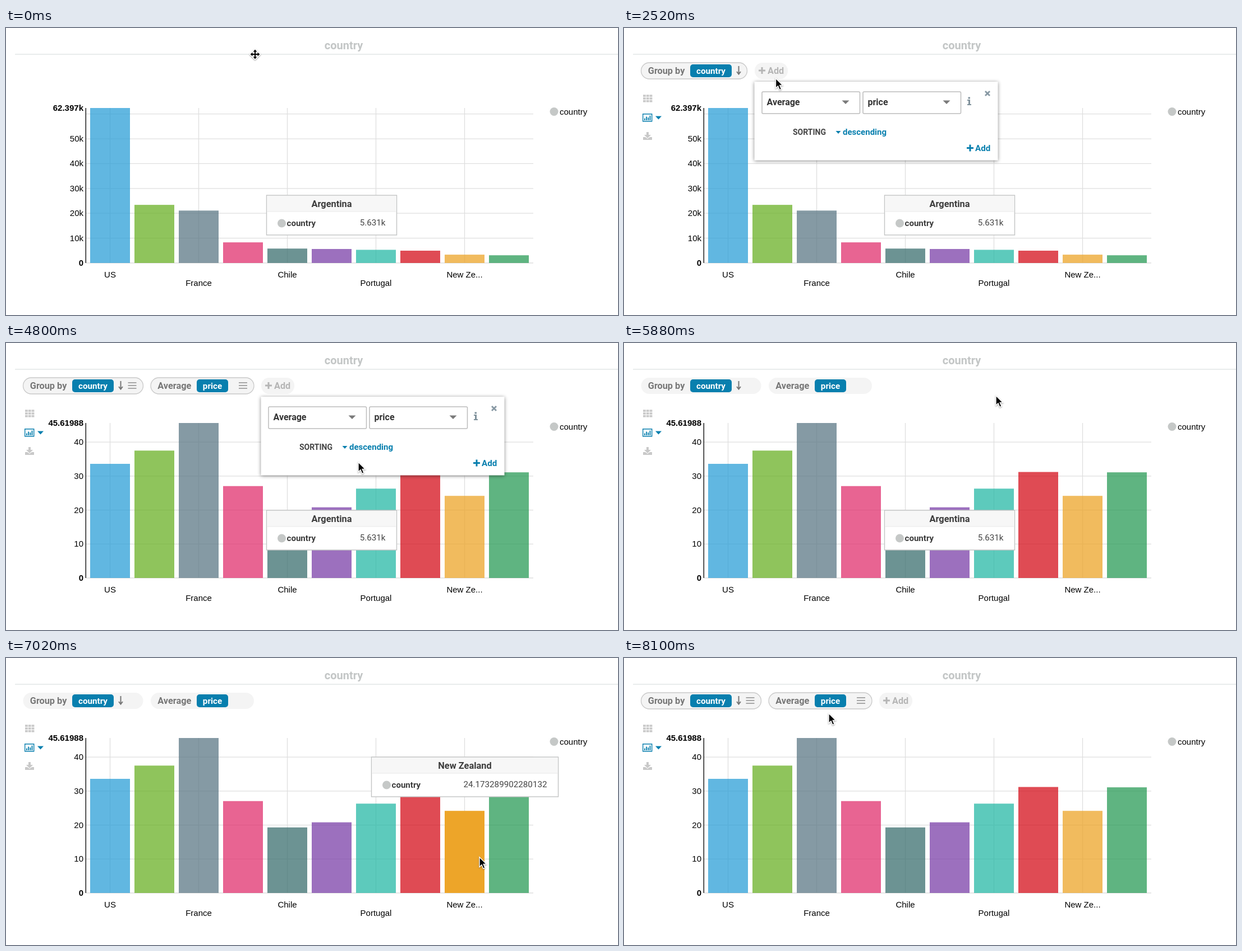
Write an HTML page that moves like this. It is 1091 px wide and 513 px high and loops after 8160 ms.

```html
<!DOCTYPE html>
<html lang="en">
<head>
<meta charset="utf-8">
<title>Chart demo</title>
<style>
html, body { margin: 0; width: 100%; height: 100%; overflow: hidden; background: #fff; }
svg { display: block; }
text { font: 700 16px Roboto, sans-serif; }
#chart text { font: 15px "Liberation Sans", Arial, sans-serif; }
#chart .b { font-weight: 700; }
</style>
</head>
<body>
<svg id="stage" width="1091" height="513" viewBox="0 0 1091 513"></svg>
<script>
const LOOP = 8160, BASE = 420, HIGH = 277, STEP = 79;
const ADDED = 4130; // the price average joins the chart
const BLUE = '#087fae', PALE = '#c9c9c9';

// Country, colour, count in thousands, average price
const data = [
  ['US', '#2d9fd7', 62.397, 33.6],
  ['Italy', '#6ab026', 23.4, 37.5],
  ['France', '#5d7886', 21.1, 45.61988],
  ['Spain', '#e0306e', 8.3, 27.048529411764704],
  ['Chile', '#3b6f6f', 5.8, 19.3],
  ['Argentina', '#7b40a9', 5.631, 20.8],
  ['Portugal', '#27b9a6', 5.3, 26.3],
  ['Australia', '#d50f1b', 4.95, 31.2],
  ['New Zealand', '#eda529', 3.35, 24.173289902280132],
  ['Austria', '#2a9b57', 3.1, 31.1]
];
const peaks = [data[0][2], data[2][3]];
const barX = i => 150 + STEP * i;
const topOf = (i, n) => BASE - data[i][2 + n] / peaks[n] * HIGH;

// Markup helpers
const text = (x, y, s, size, fill, more = '') =>
  `<text x="${x}" y="${y}" style="font-size:${size}px" fill="${fill}" ${more}>${s}</text>`;
const label = (x, y, s, anchor = 'start', cls = '') =>
  `<text x="${x}" y="${y}" text-anchor="${anchor}" class="${cls}">${s}</text>`;
const rect = (x, y, w, h, fill, more = '') =>
  `<rect x="${x}" y="${y}" width="${w}" height="${h}" fill="${fill}" ${more}/>`;
const line = (d, stroke, w = 1.3) => `<path d="${d}" fill="none" stroke="${stroke}" stroke-width="${w}"/>`;
const shape = (d, fill, more = '') => `<path d="${d}" fill="${fill}" ${more}/>`;
const dot = (x, y) => `<circle cx="${x}" cy="${y}" r="7.5" fill="#c5c8c7"/>`;
const plus = (x, y, c) => line(`M${x - 6} ${y}h12m-6-6v12`, c, 3);
const group = (id, s, more = '') => `<g id="${id}" ${more}>${s}</g>`;
const MID = 'text-anchor="middle"';

const pill = (x, w, name, chipX, chipW, s, more = '') =>
  rect(x, 62, w, 29, '#f4f4f4', 'class="body" rx="14.5"') +
  rect(x, 62, w, 29, 'none', `class="body lit" rx="14.5" stroke="${PALE}" stroke-width="1.3"`) +
  text(x + 12.3, 82, name, 16.3, '#777') + rect(chipX, 65, chipW, 23, BLUE, 'rx="5"') +
  text(chipX + chipW / 2, 82, s, 15.2, '#fff', MID) + more +
  `<g class="lit menu">${line(`M${x + w - 27} 71h15m-15 5h15m-15 5h15`, '#a6a6a6', 2)}</g>`;

const ticks = (n, step, count, unit, top) => {
  let s = '';
  for (let i = 1; i <= count; i++)
    s += `<g class="tick" data-rise="${step * i / peaks[n] * HIGH}">${line('M143 0H940', '#dfdfdf')}` +
      (i < 6 ? label(138, 5, step * i + unit, 'end') : '') + '</g>';
  return group('ticks' + n, s + label(138, 148, top, 'end', 'b'));
};
const odd = data.map((_, i) => i).filter(i => i % 2 == 0);
const chart = odd.map(i => line(`M${barX(i) + 35.5} 143V${BASE}`, '#dfdfdf')).join('') +
  line(`M143 ${BASE}H940`, '#dfdfdf') +
  ticks(0, 10, 6, 'k', '62.397k') + ticks(1, 10, 4, '', peaks[1]) + label(138, 425, 0, 'end', 'b') +
  data.map((d, i) => rect(barX(i), 0, 71, 0, d[1], 'class="bar"')).join('') +
  line(`M142.3 143V${BASE}`, '#111', 1.4) +
  odd.map(i => label(barX(i) + 35.5, i % 4 ? 461 : 446, data[i][0].replace(/^(.{6}).{5}$/, '$1...'), 'middle')).join('') +
  dot(977, 149.5) + label(987, 155, 'country');

let grid = '';
for (let i = 0; i < 9; i++) grid += rect(34 + i % 3 * 5.8, 119.3 + (i / 3 | 0) * 4.8, 4.8, 3.7, PALE);
const icons = grid + line('M33.7 153.7h16v13h-16z', BLUE, 1.4) +
  line('M36.9 165v-3.500m3.200 3.500v-6.500m3.200 6.500v-5m3.200 5v-8.500', BLUE, 1.9) +
  shape('M56 157.5h11l-5.5 6z', BLUE) +
  shape('M40 186h4v5h4l-6 6-6-6h4zM34 195h4l4 3 4-3h4v5H34z', PALE);

const select = (x, s) => rect(x, 114, 174.5, 39, '#fff', 'rx="2" stroke="#bcbcbc" stroke-width="1.5"') +
  text(x + 8.5, 138, s, 16, '#333') + shape(`M${x + 142.5} 129.5h13l-6.5 6.5z`, '#7a7a7a');
const panel = rect(.5, 96, 434, 140.5, '#fff', 'style="filter:drop-shadow(0 1px 3px #0007)"') +
  select(14, 'Average') + select(194, 'price') +
  shape('M380 128h5v8h2v2h-7v-2h2v-6h-2zM381.5 123.500h3.500v3h-3.500z', '#7f919b') +
  line('M412 113l8 8m0-8l-8 8', '#8798a3', 2.8) +
  text(69, 191, 'SORTING', 14, '#444', 'font-weight="500"') +
  shape('M145.5 184h9l-4.5 5z', BLUE) + text(158, 191, 'descending', 15, BLUE) +
  group('ok', plus(385, 214.5, 'currentColor') + text(394, 220, 'Add', 15.2, 'currentColor'));

const cursors =
  group('arrow', shape('M0 0V17.5L4 13.7 6.8 20.5 10 19.2 7.2 12.5H12.5Z', '#000', 'stroke="#fff" stroke-width="1.4"')) +
  group('hand', shape('M-1.5 11V2C-1.5-.5 2-.5 2 2V7C3 6 5 6 5.5 7.500C6.500 6.500 8.500 7 9 8.500C10 8 12 8.500 12 10.500V14C12 17 10.500 18 10 21H0C0 18-2 16.500-4 13.500C-6 10.500-3.500 9-1.500 12Z',
    '#fff', 'stroke="#222" stroke-width="1.3"') + line('M2.5 13v4.500m3-4.500v4.500m3-4.500v4.500', '#222', 1)) +
  group('move', shape('M0-9L9 0 0 9-9 0z', '#fff', 'stroke="#fff" stroke-width="2"') +
    line('M-6 0H6M0-6V6', '#000', 2) +
    [0, 90, 180, 270].map(a => shape('M0-8.500l3.500 4h-7z', '#000', `transform="rotate(${a})"`)).join(''));

const $ = id => document.getElementById(id);
const all = s => [...document.querySelectorAll(s)];
$('stage').innerHTML =
  text(602, 38, 'country', 20, '#c3c6c6', MID) + line('M16 47H1091', '#e2e6e6', 1.6) +
  group('chart', chart) +
  group('tools', icons +
    group('groupBy', pill(30.5, 214, 'Group by', 118, 74, 'country', line('M204.5 68v14m-3.5-4l3.5 4.5 3.5-4.500', '#777', 2))) +
    group('average', pill(258, 184, 'Average', 340, 56, 'price')) +
    group('add', rect(0, 62, 59, 29, '#f4f4f4', 'rx="14"') + plus(13, 76, '#b5b5b5') + text(23, 82, 'Add', 16.2, '#b5b5b5'), 'class="lit"')) +
  group('tip', '') + group('panel', panel) +
  group('cursor', cursors, 'style="filter:drop-shadow(0 1px 1px #0006)"');

const bars = all('.bar'), lit = all('.lit'), menus = all('.menu'), frames = all('#groupBy .body');
const tickSets = [all('#ticks0 .tick'), all('#ticks1 .tick')];

// Cursor stops: time, x, y
const path = [
  [0, 444, 47], [540, 300, 105], [1500, 266, 79], [2460, 267.5, 89], [3600, 628, 213], [4800, 628, 213],
  [5160, 652, 62], [5400, 663, 94], [5880, 663, 94], [6360, 345, 235], [6540, 483, 318],
  [6720, 505, 325], [6900, 835, 355], [7020, 844, 356], [7440, 846, 358], [8100, 365, 99], [LOOP, 365, 99]
];

const ramp = (t, a, b) => {
  const v = Math.max(0, Math.min(1, (t - a) / (b - a)));
  return v * v * (3 - 2 * v);
};
const show = (el, v) => el.setAttribute('opacity', +v);
const shift = (el, x, y) => el.setAttribute('transform', `translate(${x} ${y})`);

function cursorAt(t) {
  const i = path.findIndex(p => p[0] > t), [t0, x0, y0] = path[i - 1], [t1, x1, y1] = path[i];
  const k = ramp(t, t0, t1);
  return [x0 + (x1 - x0) * k, y0 + (y1 - y0) * k];
}

// Bar under the cursor, or -1
function barAt(t) {
  if (t < 5900) return -1;
  const [x, y] = cursorAt(t), i = Math.floor((x - 146) / STEP);
  return data[i] && y > topOf(i, 1) ? i : -1;
}

let shown;
function drawTip(i, n) {
  show($('tip'), i >= 0);
  if (i < 0 || shown == i + '/' + n) return;
  shown = i + '/' + n;
  const w = n ? 333 : 232;
  shift($('tip'), Math.round(barX(i) + 35 - w / 2) + .5, Math.round(topOf(i, n) - 96.5));
  $('tip').innerHTML = rect(0, 0, w, 71, '#fff', 'stroke="#c2c4c4" stroke-width="1.4"') +
    rect(1, 1, w - 2, 28, '#f7f7f7') + line(`M1 29H${w - 1}`, '#e8e8e8', 1) +
    text(w / 2, 21, data[i][0], 16.4, '#3c3c3c', MID) + dot(27, 50) + text(36, 55, 'country', 15.1, '#3c3c3c') +
    text(w - 20, 54, n ? data[i][3] : data[i][2] + 'k', '15.2px;font-weight:400;letter-spacing:0', '#444', 'text-anchor="end"')
      .replace('0px"', '0"');
}

function draw(t) {
  const two = t >= ADDED, k = ramp(t, 4180, 4500), hover = barAt(t - 125);
  bars.forEach((bar, i) => {
    const y = topOf(i, 0) * (1 - k) + topOf(i, 1) * k;
    bar.setAttribute('y', y);
    bar.setAttribute('height', BASE - y);
    show(bar, i == hover ? 1 : .75);
  });
  tickSets.forEach((set, n) => {
    show($('ticks' + n), n ? k : 1 - k);
    set.forEach(g => shift(g, 0, BASE - g.dataset.rise * (n ? k : 1)));
  });

  const glow = 1 - ramp(t, 5200, 5380) + ramp(t, 7840, 7980);
  show($('tools'), ramp(t, 180, 360));
  lit.forEach(el => show(el, glow));
  menus.forEach(el => show(el, two && glow));
  frames.forEach(el => el.setAttribute('width', two ? 214 : 189));
  show($('average'), two);
  shift($('add'), two ? 455 : 233, 0);

  drawTip(t < 5980 ? 5 : barAt(t - 60), +(t >= 5980));

  show($('panel'), ramp(t, 1560, 1680) * (1 - ramp(t, 5120, 5220)));
  shift($('panel'), two ? 454 : 232, 0);
  $('ok').setAttribute('color', t > 3400 && t < 4220 ? '#2b9fd6' : BLUE);

  shift($('cursor'), ...cursorAt(t));
  const kind = t < 120 ? 'move' : t > 1300 && t < 2460 || t > 3400 && t < 4300 ? 'hand' : 'arrow';
  ['arrow', 'hand', 'move'].forEach(id => show($(id), id == kind));
}

const start = performance.now();
function frame(now) {
  draw(Math.max(0, now - start) % LOOP);
  requestAnimationFrame(frame);
}
draw(0);
requestAnimationFrame(frame);
</script>
</body>
</html>
```
